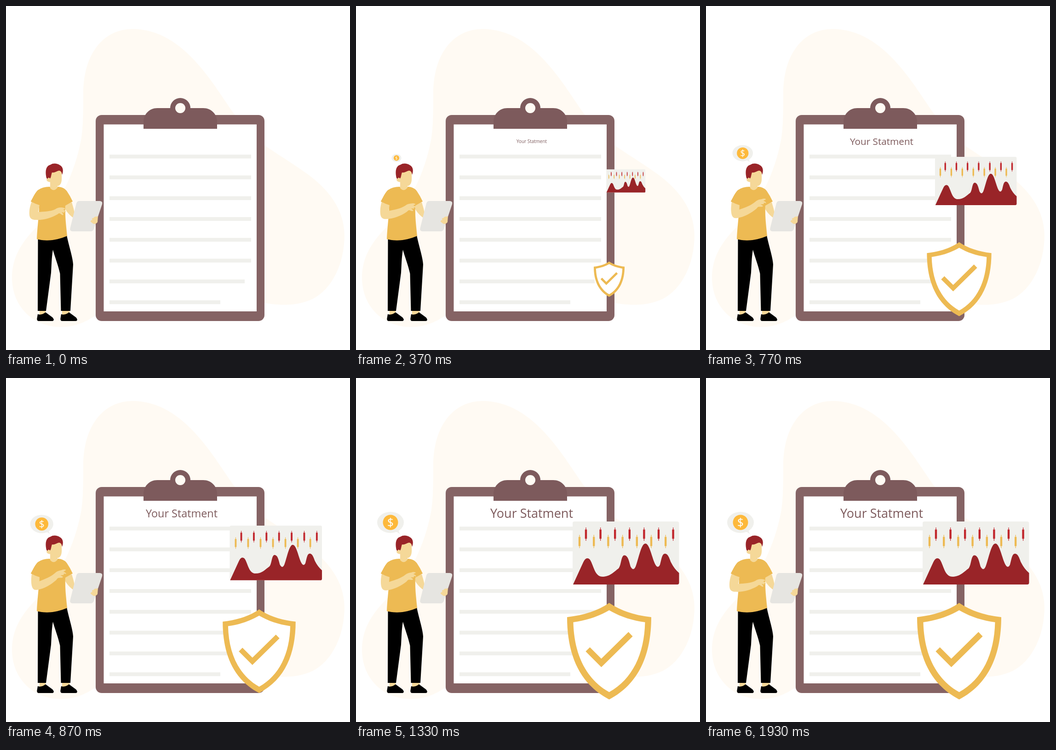
An HTML page that plays this animation: 748 px wide and 748 px high, repeating every 1.97 s.

```html
<!DOCTYPE html>
<html lang="en">
<head>
<meta charset="utf-8">
<title>Your Statment</title>
<style>
  html, body { margin: 0; width: 100%; height: 100%; overflow: hidden; background: #fff; }
  svg { display: block; width: 100%; height: 100%; }
  text { font-family: "Open Sans", "Noto Sans", sans-serif; text-anchor: middle; }
  .skin { fill: #f5d898; }
  .shirt { fill: #edba53; }
  .plum { fill: #7d5a5c; }
  .wine { fill: #992428; }
  .pale { fill: #f0f0ec; }
</style>
</head>
<body>
<svg viewBox="0 0 748 748">
  <path fill="#fffaf3" d="M275 50C215 50 167 100 168 195C168 240 167 270 163 292C150 360 118 432 68 479C30 517 13 550 13 592C14 655 60 698 120 698C155 698 185 682 205 664L540 640C580 652 625 654 660 640C705 622 736 565 736 498C735 440 700 398 655 365C620 340 590 322 562 303C530 285 515 260 498 237C455 180 390 50 275 50Z"/>

  <g id="board">
    <rect x="195" y="237" width="367" height="448" rx="13" fill="#856364"/>
    <rect x="212.5" y="257.5" width="332.5" height="406.5" fill="#fff"/>
    <path class="plum" d="M299 267V252C299 235 312 222 329 222H429C446 222 459 235 459 252V267Z"/>
    <circle class="plum" cx="379" cy="222" r="22"/>
    <circle cx="379" cy="222" r="11" fill="#fffaf3"/>
  </g>
  <g id="lines" class="pale"></g>

  <g id="man">
    <path class="skin" d="M73 661H86V674H73ZM122 661H138V674H122Z"/>
    <path id="shoe" d="M69 670Q77 673 86 666L101 677Q106 682 102 685H70Q66 684 68 676Z"/>
    <use href="#shoe" x="51"/>
    <path d="M69.5 506Q100 512 132 498C136 520 145 545 146 562L140 663H119.500L117.500 582C113 562 106 545 102 530C99 548 99 565 98 580L87 663H69Z"/>
    <path class="skin" d="M128 431L143 427C147 440 150 450 150 462L144 459Q135 452 129 442Z"/>
    <path fill="#e6e5e1" d="M159 424H204Q211 425 209 431L191 485Q189 490 184 490H144Q138 489 139.500 483L153 429Q155 424 159 424Z"/>
    <path class="skin" d="M200 457L199 470Q194 476 189 473L184 469Q183 466 188 465Q185 461 190 461Q193 457 197 458Z"/>
    <path class="shirt" d="M94 393Q104 396 114 393Q126 394 132 402Q139 412 145 425L129 434C128 458 131 480 133 500Q98 515 67 507C68 480 72 455 72 433L54 425C60 414 64 405 70 400Q80 393 94 393Z"/>
    <path class="skin" d="M97 358H120C122 372 122 385 117 389Q114 392 112 391V395Q104 405 96 396V383Q88 382 88 377Q91 371 97 373Z"/>
    <path class="wine" d="M88 374C85 360 86 348 97 345C102 341 112 342 117 346C125 350 125 360 122 367C121 361 119 358 115 358C110 359 106 363 100 362C98 368 98 373 96 375Q92 371 90 376Z"/>
    <path id="arm" class="skin"/>
    <path class="shirt" d="M70 400C64 405 60 414 54 425Q63 430 73 433L79 405Z"/>
  </g>

  <g id="bubble">
    <ellipse class="pale" cx="75" cy="314" rx="29" ry="23"/>
    <path class="pale" d="M82 334Q91 334 95.500 340Q93 334 92 329Z"/>
    <circle cx="75" cy="314" r="16.500" fill="#fdb93b"/>
    <text x="75" y="323" font-size="25" fill="#fff">$</text>
  </g>

  <text id="title" class="plum" x="382" y="304" font-size="27">Your Statment</text>

  <g id="chart">
    <rect class="pale" x="471" y="312" width="231.500" height="137" rx="4"/>
    <path class="wine" d="M472 449L494 401Q498 392 503 392Q508 392 511 399C518 414 521 432 536 432C552 432 560 422 571 414C577 407 576 386 583.500 385.500C592 386 594 400 597 410Q603 421 608 410C614 395 620 360 629 360C638 360 642 385 650 404Q656 416 661 406C664 396 665 382 672 382C679 382 682 394 685 401Q692 415 702.500 424V445Q702.500 449 698.500 449Z"/>
    <g id="candles"></g>
  </g>

  <g id="shield">
    <path class="shirt" d="M550.500 489C526 506 495 516 459 520C459 600 485 665 550.500 699C616 665 642 600 642 520C606 516 575 506 550.500 489Z"/>
    <path fill="#fff" d="M550.500 505C528 518 503 527 472.500 531C474 600 500 655 550.500 683C601 655 627 600 628.500 531C598 527 573 518 550.500 505Z"/>
    <path fill="none" stroke="#edba53" stroke-width="13" d="M504 590L533.500 619.500L597 557"/>
  </g>
</svg>
<script>
const $ = id => document.getElementById(id);

function rect(parent, x, y, w, h, fill) {
  const r = document.createElementNS("http://www.w3.org/2000/svg", "rect");
  const attrs = { x, y, width: w, height: h };
  if (fill) attrs.fill = fill;
  for (const name in attrs) r.setAttribute(name, attrs[name]);
  parent.append(r);
}

function candle(x, y, fill) {
  rect($("candles"), x - 2.2, y - 10, 4.4, 20, fill);
  rect($("candles"), x - 0.6, y - 14.5, 1.2, 29, fill);
}

for (let i = 0; i < 8; i++) {
  rect($("lines"), 225, 323.2 + 45.25 * i, [308, 294, 241][Math.max(0, i - 5)], 8.3);
}
for (let i = 0; i < 7; i++) {
  candle(486 + 31.2 * i, 355.5, "#edba53");
  candle(500 + 31.6 * i, 339.5, "#c1272d");
}

const armLow = "M56 425C52 435 50 445 51 455C52 463 58 465 64 465C82 466 98 461 112 453Q115 450 117 451L123 455L125 453L121 448L127 450L126 447L131 448Q129 444 124 443L129 441Q126 438 120 438Q112 438 107 442C96 447 84 447 70 448L73 432Z";
const armHigh = "M56 425C55 435 55 445 57 452C59 459 63 461 68 460C84 457 98 447 109 437Q112 432 115 432L122 431L124 429L118 426L125 425L126 422L131 423Q130 419 125 418L131 414Q127 411 120 415Q113 416 108 420C98 430 86 435 73 441L73 432Z";
const highNums = armHigh.match(/\d+/g).map(Number);

function armPath(k) {
  let i = 0;
  return armLow.replace(/\d+/g, n => (+n + (highNums[i++] - n) * k).toFixed(2));
}

// Points each part grows from
const growers = {
  bubble: [95.5, 340],
  title: [382, 294],
  chart: [586.7, 380.4],
  shield: [550.5, 594]
};

const LOOP = 1970, LAST = 59, PEAK = 30;

function draw(ms) {
  // 30 steps a second, on a 10 ms grid
  const step = Math.floor((Math.floor((ms % LOOP) / 10) * 10 + 4) * 0.03);
  const size = Math.min(1, step / PEAK);
  for (const id in growers) {
    const [x, y] = growers[id];
    const el = $(id);
    el.style.display = size ? "" : "none";
    el.setAttribute("transform", `translate(${x} ${y}) scale(${size}) translate(${-x} ${-y})`);
  }
  const lift = step <= PEAK ? size : (LAST - step) / (LAST - PEAK);
  $("arm").setAttribute("d", armPath(lift));
}

const start = performance.now();
function tick() {
  draw(performance.now() - start);
  requestAnimationFrame(tick);
}
draw(0);
requestAnimationFrame(tick);
</script>
</body>
</html>
```
